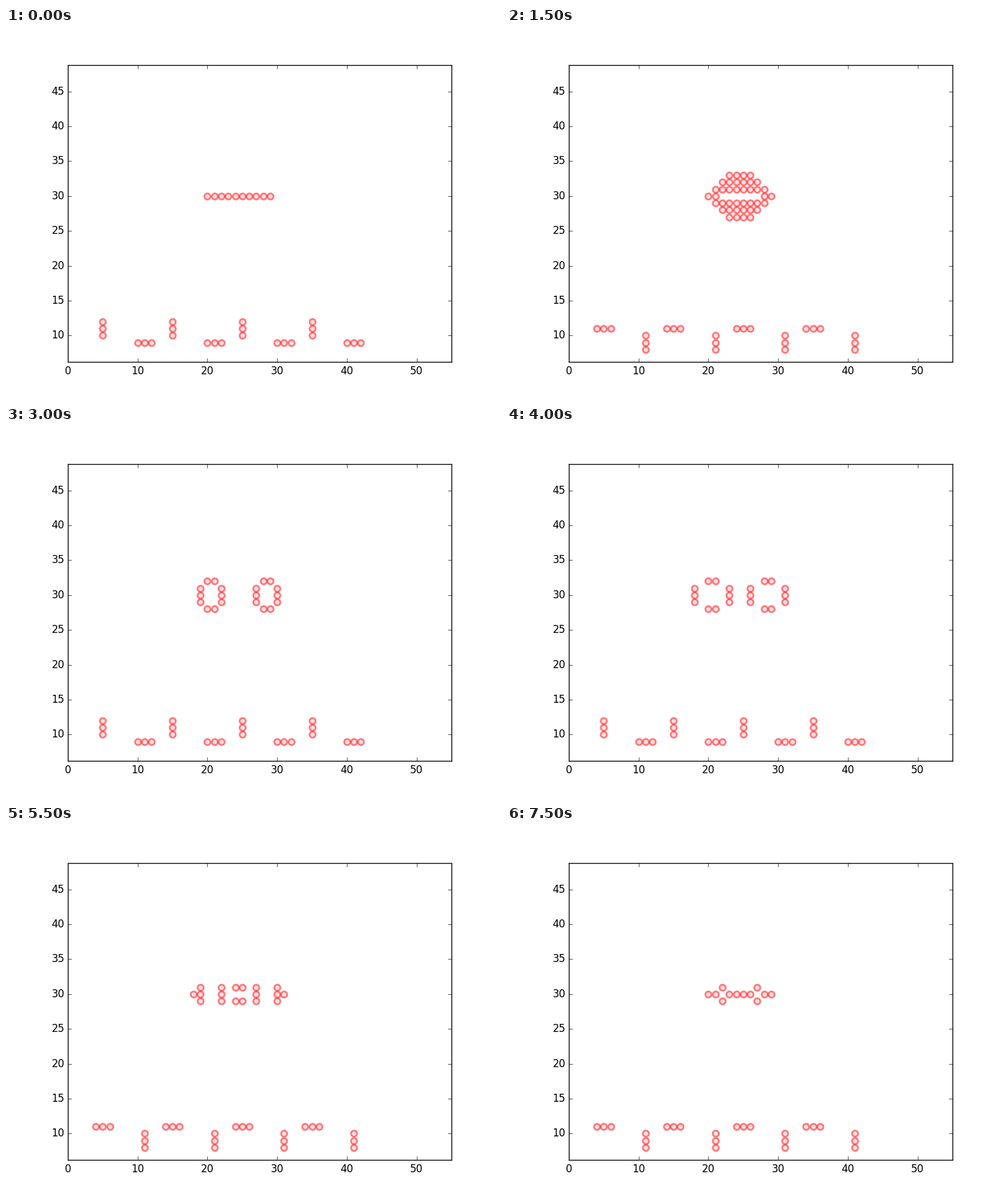
Animation, 800 px wide and 600 px high, one loop 8 s. Source, as a matplotlib script:

```python
import numpy as np
import matplotlib.pyplot as plt
from matplotlib.animation import FuncAnimation

plt.style.use("classic")

SIZE = 55
STEPS = 16
INTERVAL = 500


def row(x, y, n):
    return [(x + i, y) for i in range(n)]


def column(x, y, n):
    return [(x, y + i) for i in range(n)]


def first_grid():
    cells = row(20, 30, 10)
    for x in range(5, 36, 10):
        cells += column(x, 10, 3) + row(x + 5, 9, 3)
    grid = np.zeros((SIZE, SIZE), dtype=int)
    grid[tuple(np.transpose(cells))] = 1
    return grid


def evolve(grid):
    """One step of Conway-style birth (3) and survival (2 or 3)."""
    near = sum(
        np.roll(grid, (dx, dy), axis=(0, 1))
        for dx in (-1, 0, 1)
        for dy in (-1, 0, 1)
        if dx or dy
    )
    return ((near == 3) | ((grid == 1) & (near == 2))).astype(int)


generations = [first_grid()]
while len(generations) < STEPS:
    generations.append(evolve(generations[-1]))

fig = plt.figure(figsize=(8, 6), dpi=100, facecolor="white")
ax = fig.add_axes([0.125, 0.1, 0.775, 0.8])

# Equal scale on both axes, centred vertically on the grid
half = SIZE * 480 / 620 / 2
ax.set_xlim(0, SIZE)
ax.set_ylim(SIZE / 2 - half, SIZE / 2 + half)
ax.set_xticks(range(0, 51, 10))
ax.set_yticks(range(10, 46, 5))

start = np.argwhere(generations[0])
dots = ax.scatter(start[:, 0], start[:, 1], s=50, linewidths=2, alpha=0.5,
                  facecolors="pink", edgecolors="red")


def update(i):
    dots.set_offsets(np.argwhere(generations[i]))
    return (dots,)


anim = FuncAnimation(fig, update, frames=STEPS, interval=INTERVAL,
                     repeat=True, repeat_delay=0)
plt.show()
```
